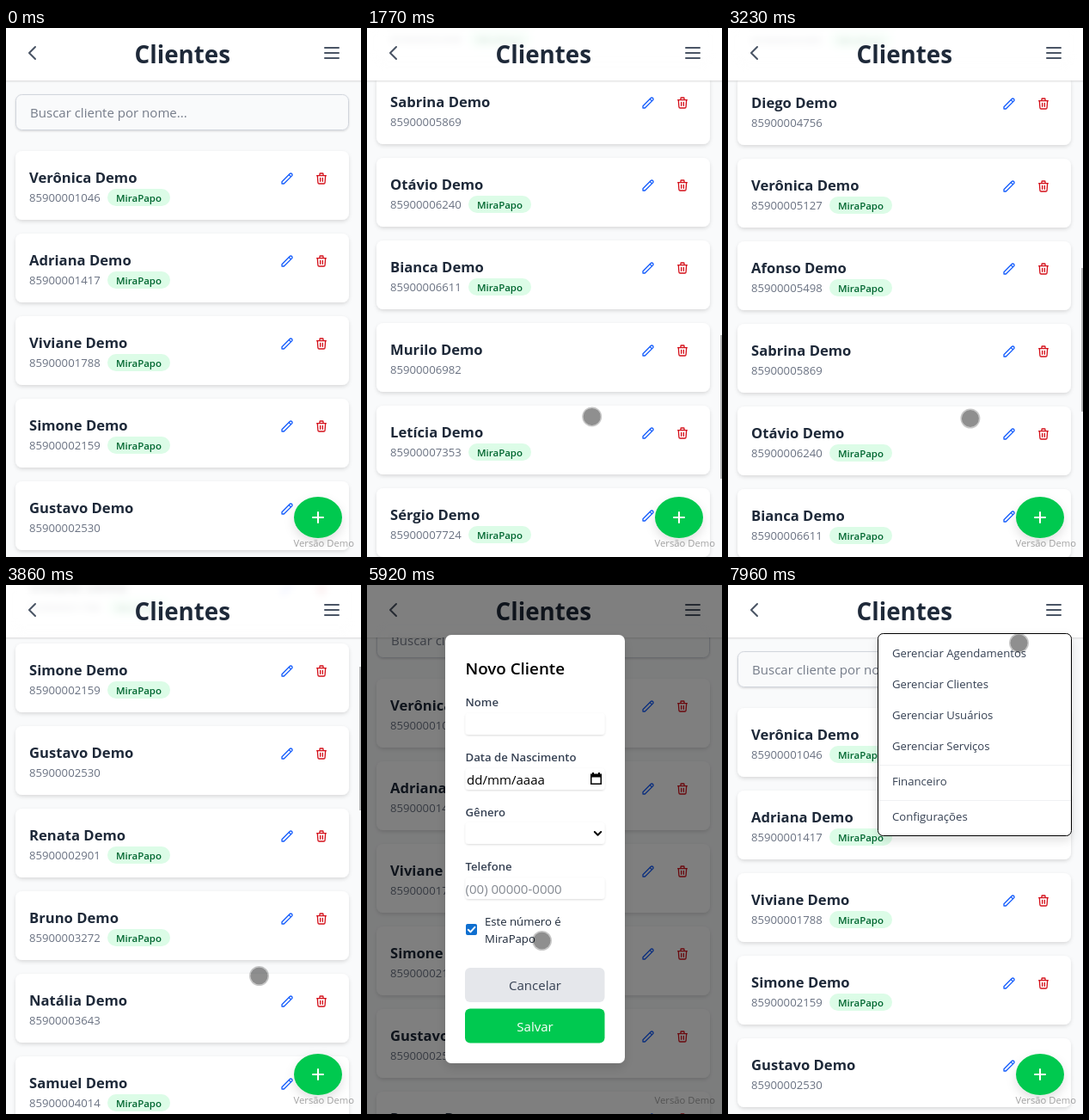
Animation of 413 by 615 pixels, one loop 8 s. Source, as an HTML page:

```html
<!DOCTYPE html>
<html lang="pt-BR">
<head>
<meta charset="utf-8">
<title>Clientes</title>
<style>
  html, body { margin: 0; width: 100%; height: 100%; overflow: hidden; background: #f9fafb; }
  svg { display: block; width: 413px; height: 615px; }
  text { font-family: "Open Sans", "Noto Sans", sans-serif; white-space: pre; }
  .line { fill: none; stroke-linecap: round; stroke-linejoin: round; }
</style>
</head>
<body>
<svg id="stage" viewBox="0 0 413 615" xmlns="http://www.w3.org/2000/svg"></svg>
<script>
const LOOP = 8000, STEP = 68;
const INK = '#1e2939', SLATE = '#364153', GREEN = '#00c950', CHAT = 'MiraPapo';

const NAMES = ['Verônica', 'Adriana', 'Viviane', 'Simone', 'Gustavo', 'Renata', 'Bruno',
  'Natália', 'Samuel', 'Cristina', 'Diego', 'Verônica', 'Afonso', 'Sabrina', 'Otávio',
  'Bianca', 'Murilo', 'Letícia', 'Sérgio', 'Angélica'];

// Markup helpers
const text = (x, y, str, size, fill = INK, weight = 400, anchor = 'start') =>
  `<text x="${x}" y="${y}" font-size="${(size * 0.94).toFixed(2)}" fill="${fill}" font-weight="${weight}" text-anchor="${anchor}">${str}</text>`;
const box = (x, y, w, h, r, fill, extra = '') =>
  `<rect x="${x}" y="${y}" width="${w}" height="${h}" rx="${r}" fill="${fill}" ${extra}/>`;
const line = (d, stroke, width = 1.5) =>
  `<path class="line" d="${d}" stroke="${stroke}" stroke-width="${width}"/>`;
const icon = (x, y, d, stroke) =>
  `<g transform="translate(${x} ${y}) scale(.6667)">${line(d, stroke, 2)}</g>`;

const pencil = icon(319, 167, 'M15.2 5.2l3.6 3.6m-2.1-5.1a2.5 2.5 0 1 1 3.6 3.6L6.5 21H3v-3.5z', '#155dfc');
const trash = icon(359, 167, 'M19 7l-.9 12.1a2 2 0 0 1-2 1.9H7.9a2 2 0 0 1-2-1.9L5 7m5 4v6m4-6v6m1-10V4a1 1 0 0 0-1-1h-4a1 1 0 0 0-1 1v3M4 7h16', '#d4101a');

function card(name, i) {
  const tag = i < 4 || i % 3 !== 1;
  return `<g transform="translate(0 ${i * 96})">
    ${box(11, 143, 388, 80, 8, '#fff', 'filter="url(#soft)"')}
    ${text(27, 180, name + ' Demo', 17.7, INK, 700)}
    ${text(27, 202, '8590000' + (1046 + i * 371), 14, '#6a7282')}
    ${tag ? box(118, 187, 73, 20, 10, '#dcfce7') + text(154.5, 201.5, CHAT, 12.2, '#016630', 600, 'middle') : ''}
    ${pencil}${trash}</g>`;
}

function pager() {
  const items = [['&lt;', 117, 33], ['', 154, 30], ['2', 188, 32], ['3', 224, 32], ['&gt;', 260, 33]];
  return items.map(([label, x, w], i) => box(x, 2074, w, 35, 6, '#fff') +
    text(x + w / 2, 2097, label, 14, i % 4 ? INK : '#4a5565', i % 4 ? 600 : 400, 'middle')).join('');
}

const footer = box(0, 2199, 413, 90, 0, '#0f172b') +
  box(60, 2237, 293, 34, 8, '#1a2438') +
  text(62, 2221, 'Desenvolvido por Otávio Luna', 12.2, '#a9b6c8') +
  text(232, 2221, '|', 12, '#a9b6c8') + text(247, 2221, 'Vínculos', 12, '#a9b6c8') +
  text(299, 2221, '|', 12, '#a9b6c8') + text(310, 2221, 'Códigos', 12, '#a9b6c8') +
  text(76, 2259, '<tspan font-weight="700">Login de teste:</tspan> login.demo@site.test / teste123', 12.3, '#a9b6c8');

const header = box(-10, -10, 433, 71, 0, '#fff', 'filter="url(#thin)"') +
  `<g clip-path="url(#top)"><use href="#page" filter="url(#blur)" opacity=".2"/></g>` +
  line('M34 22l-7 7 7 7', '#4a5565', 2) +
  text(205.3, 41, 'Clientes', 29.5, INK, 700, 'middle') +
  line('M371 23h16M371 29h16M371 35h16', '#4a5565', 2);

const field = y => box(114.5, y, 162, 25, 4, '#fff', 'filter="url(#thin)"');
const label = (y, str) => text(114.5, y, str, 14, SLATE, 600);

const modal = box(0, 0, 413, 615, 0, '#000', 'opacity=".5"') +
  box(91, 58, 209, 498, 7, '#fff', 'filter="url(#deep)"') +
  text(114.5, 104, 'Novo Cliente', 20, '#000', 600) +
  label(141, 'Nome') + field(149) +
  label(205, 'Data de Nascimento') + field(213) + text(116, 232, 'dd/mm/aaaa', 16, '#000') +
  `<path d="M260 219.5h2v-1.5h2v1.5h5v-1.5h2v1.5h2v12.5h-13zM261.5 223.5v7h10v-7z" fill="#000" fill-rule="evenodd"/>` +
  label(269, 'Gênero') + field(276) + line('M264.8 287l3.7 3.7 3.7-3.7', '#000', 2) +
  label(332, 'Telefone') + field(340) + text(114.5, 359, '(00) 00000-0000', 16, '#858a92') +
  box(115, 394, 13, 13, 2, '#0f6fd0') + line('M117.8 400.7l2.6 2.7 5-5.6', '#fff', 2) +
  text(137, 396, 'Este número é', 14) + text(137, 416, CHAT, 14) +
  box(114, 445, 162.5, 40, 6, '#e5e7eb') + text(195.5, 471, 'Cancelar', 16, SLATE, 400, 'middle') +
  box(114, 492.5, 162.5, 40, 6, GREEN) + text(195.5, 519, 'Salvar', 16, '#fff', 400, 'middle');

const menu = box(174.5, 56.5, 225, 235, 6, '#fff', 'stroke="#000" filter="url(#deep)"') +
  box(175, 209, 224, 1, 0, '#f0f1f3') + box(175, 250, 224, 1, 0, '#f0f1f3') +
  ['Gerenciar Agendamentos', 'Gerenciar Clientes', 'Gerenciar Usuários', 'Gerenciar Serviços',
    'Financeiro', 'Configurações'].map((item, i) =>
    text(191, 84 + i * 36 + Math.max(0, i - 3) * 5, item, 14, SLATE)).join('');

const shadow = (id, dy, blur, alpha) =>
  `<filter id="${id}" x="-20%" y="-20%" width="140%" height="150%"><feDropShadow dx="0" dy="${dy}" stdDeviation="${blur}" flood-color="#000" flood-opacity="${alpha}"/></filter>`;

document.getElementById('stage').innerHTML = `
  <defs>
    ${shadow('soft', 2, 2, 0.13)}${shadow('thin', 1, 1, 0.14)}${shadow('deep', 5, 6, 0.12)}
    <filter id="blur" filterUnits="userSpaceOnUse" x="0" y="0" width="413" height="2300"><feGaussianBlur stdDeviation="4"/></filter>
    <clipPath id="top"><rect width="413" height="61"/></clipPath>
  </defs>
  ${box(0, 0, 413, 615, 0, '#f9fafb')}
  <g id="page">
    ${box(11.5, 77.5, 387, 41, 7, '#f9fafb', 'stroke="#d1d5dc" filter="url(#thin)"')}
    ${text(28, 104, 'Buscar cliente por nome...', 16, '#757c89')}
    ${NAMES.map(card).join('')}${pager()}${footer}
  </g>
  ${header}
  <g id="fab">
    <ellipse cx="363" cy="569" rx="28" ry="24" fill="${GREEN}" filter="url(#deep)"/>
    ${line('M357 569h12M363 563v12', '#fff', 2)}
  </g>
  ${text(334.5, 603, 'Versão Demo', 12, 'rgba(0,0,0,.36)')}
  <g id="modal">${modal}</g>
  <g id="menu">${menu}</g>
  <rect id="thumb" x="411" width="2" height="167" fill="#000"/>
  <g id="cursor">
    <circle r="10" fill="#000" fill-opacity=".44"/>
    <circle r="10.7" fill="none" stroke="#000" stroke-opacity=".22" stroke-width="1.6"/>
  </g>`;

// Keys: [time, value, ...]
const SCROLL = [[590, 0], [1292, 720], [1428, 862], [1570, 862], [1904, 1662], [2584, 1662],
  [3876, 363], [4212, 0], [5700, 0], [6240, 85], [6600, 85], [6870, 0]];
const CURSOR = [[476, 238, 447], [1292, 248, 449], [1564, 248, 449], [1904, 270, 453], [2584, 270, 453],
  [3876, 294, 454], [4212, 294, 446], [4420, 294, 446], [5236, 363, 569], [5460, 363, 569],
  [5700, 203, 447], [6240, 203, 362], [6600, 203, 362], [6870, 200, 447], [7000, 175, 462],
  [7090, 175, 462], [7684, 380, 28], [7950, 380, 28], [7951, 338, 67]];

function at(keys, t) {
  const i = keys.findIndex(k => k[0] > t);
  if (i === 0) return keys[0].slice(1);
  if (i < 0) return keys[keys.length - 1].slice(1);
  const a = keys[i - 1], b = keys[i], p = (t - a[0]) / (b[0] - a[0]);
  return a.slice(1).map((v, j) => v + (b[j + 1] - v) * p);
}

function thumbAlpha(t) {
  if (t > 590 && t < 2300 || t > 2600 && t < 4200) return 0.27;
  return t >= 2300 && t < 2440 ? 0.12 : 0;
}

const [page, fab, modalEl, menuEl, thumb, cursor] =
  ['page', 'fab', 'modal', 'menu', 'thumb', 'cursor'].map(id => document.getElementById(id));
const show = (el, on) => el.setAttribute('visibility', on ? 'visible' : 'hidden');

function draw(time) {
  const t = Math.floor((time + 18) / STEP) * STEP;
  const scroll = Math.round(at(SCROLL, t)[0]);
  const [x, y] = at(CURSOR, t);
  const open = t >= 5290 && t < 7000;
  page.setAttribute('transform', `translate(0 ${-scroll})`);
  thumb.setAttribute('y', Math.max(0, Math.round(scroll * 0.2689 - 2.6)));
  thumb.setAttribute('opacity', thumbAlpha(t));
  cursor.setAttribute('transform', `translate(${(x + 0.5).toFixed(1)} ${(y + 0.5).toFixed(1)})`);
  show(cursor, t >= 470);
  show(modalEl, open);
  show(fab, !open);
  show(menuEl, t >= 7740);
}

function tick() {
  draw(performance.now() % LOOP);
  requestAnimationFrame(tick);
}
tick();
</script>
</body>
</html>
```
